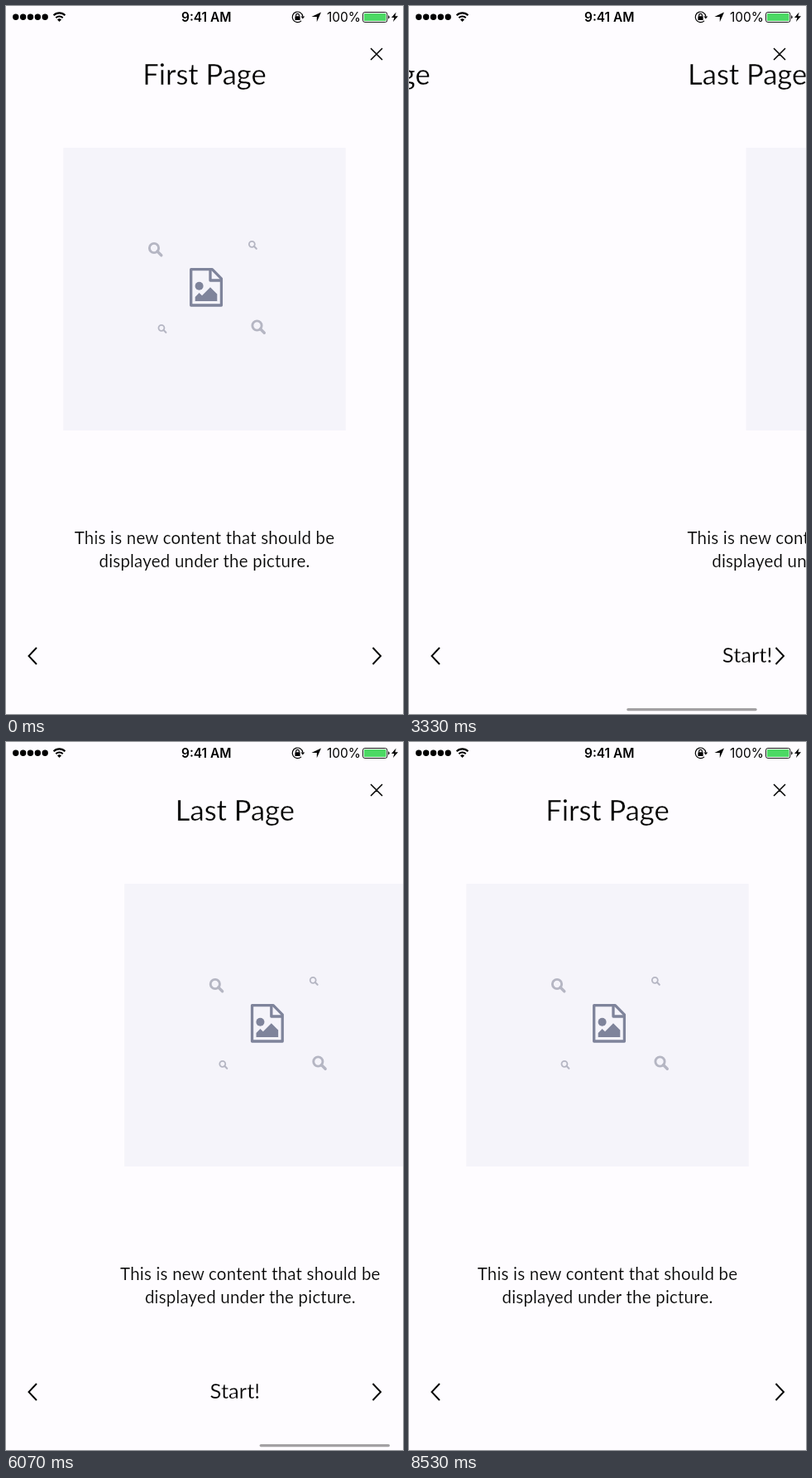
Write an HTML page that moves like this. It is 480 px wide and 854 px high and loops after 8.79 s.

```html
<!DOCTYPE html>
<html lang="en">
<head>
<meta charset="utf-8">
<title>Parallax pages</title>
<style>
  html, body { margin: 0; width: 100%; height: 100%; overflow: hidden; background: #fefcff; }
  svg { display: block; width: 100vw; height: 100vh; }
  /* The background-coloured edge makes the letters a little lighter */
  text { font-family: Lato, sans-serif; text-anchor: middle; stroke: #fefcff; stroke-width: .012em; }
  .title { font-size: 34.5px; }
  .body { font-size: 20.5px; letter-spacing: .2px; }
  .start { font-size: 25.6px; }
  .status text { font: 400 15.4px Inter, sans-serif; stroke: none; }
  .status .clock { font-weight: 600; }
  .line { fill: none; stroke: #000; }
</style>
</head>
<body>
<svg viewBox="0 0 480 854">
  <defs>
    <g id="lens" fill="none" stroke="#b5b6c3">
      <circle cx="7" cy="7" r="5.6" stroke-width="2.9"/>
      <path d="M11 11l4.8 4.8" stroke-width="3.4" stroke-linecap="round"/>
    </g>
    <g id="picture">
      <rect x="69.3" y="171" width="341.4" height="341" fill="#f5f4fa"/>
      <use href="#lens" x="172" y="285"/>
      <use href="#lens" x="296.5" y="378.5"/>
      <use href="#lens" transform="translate(293 283) scale(.62)"/>
      <use href="#lens" transform="translate(183.6 384) scale(.62)"/>
      <g fill="none" stroke="#7f849b" stroke-width="3.3" stroke-linejoin="round">
        <path d="M223.7 317.7H249.3L260.4 328.8V361H223.7Z"/>
        <path d="M247 318V331H260"/>
      </g>
      <g fill="#7f849b">
        <circle cx="233.6" cy="337.7" r="5"/>
        <path d="M228.7 355.9V350.9L233.6 346L237 349.3L247 339.3L255.3 347.6V355.9Z"/>
      </g>
    </g>
  </defs>

  <g id="pages"></g>
  <rect id="bar" y="847" height="3.2" rx="1.6"/>

  <g class="line" stroke-width="1.5">
    <path d="M441 51L455 65M455 51L441 65"/>
    <path d="M37 774L27.5 784L37 794M443.5 774L453 784L443.5 794" stroke-width="1.9"/>
  </g>

  <g class="status">
    <path d="M11.8 13.2H48" fill="none" stroke="#000" stroke-width="7.4" stroke-linecap="round" stroke-dasharray="0 8.85"/>
    <g class="line" stroke-width="2.1">
      <path d="M57.6 11.2A9.8 9.8 0 0 1 71.4 11.2"/>
      <path d="M60.3 14.2A6 6 0 0 1 68.7 14.2"/>
    </g>
    <path d="M64.5 19L62 16.4A3.6 3.6 0 0 1 67 16.4Z"/>
    <text class="clock" x="242.2" y="18.6">9:41 AM</text>
    <g class="line" stroke-width="1.2">
      <path d="M357 17.8A6.3 6.3 0 1 1 358.8 12.6"/>
      <path d="M350.6 12.6V11.2A1.9 1.9 0 0 1 354.4 11.2V12.6"/>
    </g>
    <rect x="349.4" y="12.2" width="6.2" height="4.8" rx=".6"/>
    <path d="M356.4 12.4H361.2L358.8 15.4Z"/>
    <path d="M381 7.5L375.8 19.2V13.1H369.4Z"/>
    <text x="408.4" y="18.6">100%</text>
    <rect class="line" x="431.5" y="7.5" width="29.4" height="12" rx="2.4" stroke-width=".9"/>
    <rect x="432.9" y="8.9" width="26.6" height="9.2" rx="1.2" fill="#4cd964"/>
    <path d="M462.2 11.2A2.4 2.4 0 0 1 462.2 15.6Z"/>
    <path d="M471.6 7.4L466 14H469.4L468 19L474 12.2H470.4Z"/>
  </g>
</svg>
<script>
const LOOP = 8790, TICK = 1000 / 15, WIDTH = 480;
const FADE = 150, INSET = 3.84, TRACK = WIDTH - 2 * INSET;

// Swipes between pages, and pulls past the last one
const gestures = [
  { start: 1467, end: 2325, from: 0, to: 1 },
  { start: 2900, end: 3647, from: 1, to: 2 },
  { start: 4200, end: 5000, from: 2, to: 2, pull: 61.5 },
  { start: 5067, end: 5600, from: 2, to: 2, pull: 38.5 },
  { start: 5933, end: 6533, from: 2, to: 1 },
  { start: 6867, end: 7500, from: 1, to: 0 }
];

const pagesBox = document.getElementById("pages");
const bar = document.getElementById("bar");

const pages = ["First Page", "Second Page", "Last Page"].map((title, i) => {
  const g = document.createElementNS("http://www.w3.org/2000/svg", "g");
  g.innerHTML = `
    <use href="#picture" data-speed="2"/>
    <text class="title" x="240" y="94.5" data-speed="1">${title}</text>
    <g class="body" data-speed="1.5">
      <text x="240" y="649">This is new content that should be</text>
      <text x="240" y="676.8">displayed under the picture.</text>
    </g>` +
    (i === 2 ? `<text class="start" x="240" y="792" data-speed="1">Start!</text>` : "");
  pagesBox.append(g);
  return [...g.querySelectorAll("[data-speed]")];
});

const ease = u => u ** 3 * (u * (6 * u - 15) + 10);

function stateAt(t) {
  const g = gestures.filter(g => g.start < t).pop();
  if (!g) return { x: 0, alpha: 0 };
  const u = Math.min(1, (t - g.start) / (g.end - g.start));
  return {
    x: WIDTH * (g.from + (g.to - g.from) * ease(u)) + (g.pull || 0) * Math.sin(Math.PI * u) ** 2,
    alpha: Math.min(1, Math.max(0, 1 - (t - g.end) / FADE))
  };
}

function draw() {
  const now = performance.now() % LOOP;
  const { x, alpha } = stateAt(Math.floor((now + 5) / TICK) * TICK);

  pages.forEach((parts, i) => parts.forEach(part =>
    part.setAttribute("transform", `translate(${(i * WIDTH - x) * part.dataset.speed})`)));

  // The scroll bar shrinks against the right edge when pulled too far
  const left = INSET + x * TRACK / (3 * WIDTH);
  const over = Math.max(0, x - 2 * WIDTH);
  const length = TRACK / 3 - over;
  bar.setAttribute("x", over ? WIDTH - INSET - length : left);
  bar.setAttribute("width", length);
  bar.setAttribute("opacity", alpha * .36);
  requestAnimationFrame(draw);
}
draw();
</script>
</body>
</html>
```
